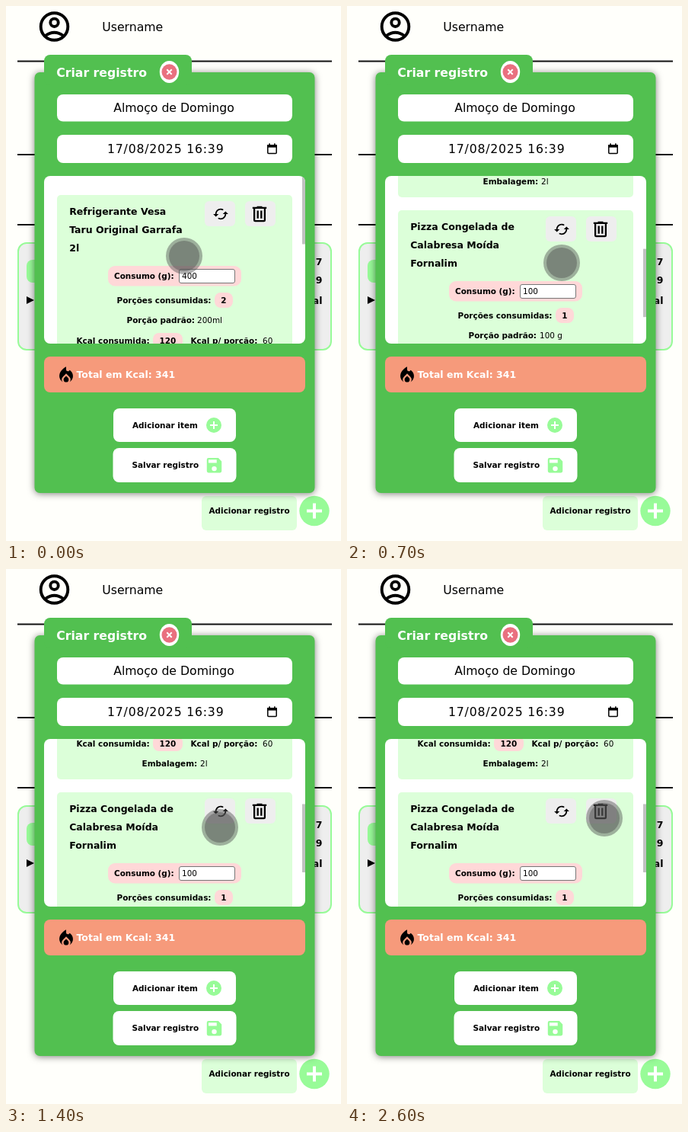
Write an HTML page with a canvas that moves like this. It is 440 px wide and 702 px high and loops after 2700 ms.

```html
<!DOCTYPE html>
<html lang="pt-BR">
<head>
<meta charset="utf-8">
<title>Criar registro</title>
<style>
  html, body { margin: 0; width: 100%; height: 100%; overflow: hidden; background: #fffffb; }
  canvas { display: block; }
</style>
</head>
<body>
<canvas id="stage" width="440" height="702"></canvas>
<script>
const ctx = document.getElementById('stage').getContext('2d');
const LOOP = 2700, STEP = 100;
const GREEN = '#52c050', MINT = '#98fb98', PALE = '#dcffd9', PINK = '#ffd8d8';
const SMALL = 10.45, MEDIUM = 12.5, LARGE = 15.7;
const LIST = { x: 50, y: 223, w: 343, h: 220 };

const icons = {
  sync: new Path2D('M19 8l-4 4h3c0 3.31-2.69 6-6 6-1 0-2-.25-2.8-.7l-1.46 1.46C9 19.5 10.4 20 12 20c4.42 0 8-3.58 8-8h3zM6 12c0-3.31 2.69-6 6-6 1 0 2 .25 2.8.7l1.46-1.46C15 4.5 13.6 4 12 4c-4.42 0-8 3.58-8 8H1l4 4 4-4z'),
  trash: new Path2D('M15 4V3H9v1H4v2h1v13a2 2 0 0 0 2 2h10a2 2 0 0 0 2-2V6h1V4zM17 19H7V6h10zM9 8h2v9H9zM13 8h2v9h-2z'),
  flame: new Path2D('M12 12.9l-2.13 2.09A2.9 2.9 0 0 0 9 17.06a3 3 0 0 0 6 0c0-.78-.31-1.52-.87-2.07zM16 6l-.44.55C14.38 8.02 12 7.19 12 5.3V2S4 6 4 13c0 2.92 1.56 5.47 3.89 6.86A4.8 4.8 0 0 1 8.47 13.56L12 10.1l3.53 3.47a4.8 4.8 0 0 1 .62 6.25c1.89-1.15 3.29-3.06 3.71-5.3C20.52 10.97 18.79 7.62 16 6z'),
  save: new Path2D('M17 3H5a2 2 0 0 0-2 2v14a2 2 0 0 0 2 2h14a2 2 0 0 0 2-2V7zM12 19a3 3 0 1 1 0-6 3 3 0 0 1 0 6zM15 9H5V5h10z')
};

const items = [
  {
    top: 248, height: 238,
    title: ['Refrigerante Vesa', 'Taru Original Garrafa', '2l'],
    grams: '400', portions: '2',
    portion: [159, 251, '200ml'],
    kcal: [93, 193, '120', 243, 337, '60'],
    pack: [179, 255, '2l']
  },
  {
    top: 503, height: 239,
    title: ['Pizza Congelada de', 'Calabresa Moída', 'Fornalim'],
    grams: '100', portions: '1',
    portion: [160, 253, '100 g'],
    kcal: [89.5, 190, '221', 239, 333, '221'],
    pack: [168.5, 244, '460 g']
  }
];

// Keyframes: [time, value...]
const scrollKeys = [[400, 0], [500, 55], [600, 105], [700, 235], [800, 315], [1200, 315], [1300, 245], [1400, 210]];
const pointerKeys = [[0, 234, 328], [100, 258, 318], [200, 287, 307], [300, 301, 304], [400, 294, 318],
  [500, 284, 334], [600, 282, 337], [1200, 282, 337], [1400, 281, 339], [1500, 283, 338],
  [1800, 319, 327], [2000, 336, 327], [2600, 338, 327]];

function sample(keys, t) {
  const next = keys.findIndex(k => k[0] > t);
  if (next === 0) return keys[0].slice(1);
  if (next < 0) return keys[keys.length - 1].slice(1);
  const a = keys[next - 1], b = keys[next];
  const p = (t - a[0]) / (b[0] - a[0]);
  return a.slice(1).map((v, i) => v + (b[i + 1] - v) * p);
}

function box(x, y, w, h, r, fill, stroke, lineWidth = 1) {
  ctx.beginPath();
  ctx.roundRect(x, y, w, h, r);
  if (fill) { ctx.fillStyle = fill; ctx.fill(); }
  if (stroke) { ctx.strokeStyle = stroke; ctx.lineWidth = lineWidth; ctx.stroke(); }
}

function oval(x, y, rx, ry, fill) {
  ctx.beginPath();
  ctx.ellipse(x, y, rx, ry, 0, 0, Math.PI * 2);
  ctx.fillStyle = fill;
  ctx.fill();
}

function line(color, width, ...points) {
  ctx.beginPath();
  for (let i = 0; i < points.length; i += 4) {
    ctx.moveTo(points[i], points[i + 1]);
    ctx.lineTo(points[i + 2], points[i + 3]);
  }
  ctx.strokeStyle = color;
  ctx.lineWidth = width;
  ctx.stroke();
}

function text(str, x, y, size = SMALL, weight = 'bold', color = '#000', align = 'left') {
  ctx.font = `${weight} ${size}px "DejaVu Sans", sans-serif`;
  ctx.fillStyle = color;
  ctx.textAlign = align;
  ctx.fillText(str, x, y);
}

function icon(path, x, y, scale, color) {
  ctx.save();
  ctx.translate(x, y);
  ctx.scale(scale, scale);
  ctx.translate(-12, -12);
  ctx.fillStyle = color;
  ctx.fill(path, 'evenodd');
  ctx.restore();
}

function plus(x, y, r, arm, width) {
  oval(x, y, r, r, MINT);
  line('#fff', width, x - arm, y, x + arm, y, x, y - arm, x, y + arm);
}

function drawAvatar() {
  ctx.strokeStyle = '#000';
  ctx.lineWidth = 3.9;
  for (const [y, r] of [[27, 17.8], [21.8, 5.2]]) {
    ctx.beginPath();
    ctx.arc(63.5, y, r, 0, Math.PI * 2);
    ctx.stroke();
  }
  ctx.beginPath();
  ctx.moveTo(51.5, 39.3);
  ctx.quadraticCurveTo(63.5, 30.4, 75.5, 39.3);
  ctx.stroke();
}

function drawPage() {
  ctx.fillStyle = '#fffffb';
  ctx.fillRect(0, 0, 440, 702);
  drawAvatar();
  text('Username', 126.3, 33, LARGE, 'normal');
  for (const y of [72.5, 195, 287]) line('#111', 2, 15, y, 428, y);

  box(16, 311, 411, 140, 11, '#eeeeee', MINT, 2);
  box(27, 333, 40, 30, 8, MINT);
  ctx.beginPath();
  ctx.moveTo(27, 381);
  ctx.lineTo(37, 386);
  ctx.lineTo(27, 391);
  ctx.fillStyle = '#000';
  ctx.fill();
  text('7', 415.5, 340, MEDIUM, 'bold', '#000', 'right');
  text('9', 415.5, 364, MEDIUM, 'bold', '#000', 'right');
  text('Kcal', 415.5, 391, MEDIUM, 'bold', '#000', 'right');

  box(257, 643, 125, 45, 6, PALE);
  text('Adicionar registro', 266.5, 666);
  plus(405, 662.5, 19.7, 10, 4);
}

function drawCalendar() {
  box(343.8, 182.8, 11.4, 10.8, 1, null, '#000', 1.5);
  ctx.fillStyle = '#000';
  ctx.fillRect(343.2, 182, 12.6, 3.6);
  ctx.fillRect(345.3, 180.3, 1.6, 2.5);
  ctx.fillRect(352.1, 180.3, 1.6, 2.5);
}

function drawModal() {
  ctx.save();
  ctx.shadowColor = 'rgba(0,0,0,.5)';
  ctx.shadowBlur = 10;
  ctx.shadowOffsetY = 1;
  box(37.5, 87, 368, 552, 7, GREEN);
  ctx.restore();
  box(50, 64, 194, 40, 8, GREEN);
  text('Criar registro', 66.2, 93, LARGE, 'bold', '#fff');
  oval(214.5, 86.5, 12.7, 14.5, '#fff');
  oval(214.5, 86.5, 10, 10.2, '#e9707f');
  line('#fff', 2, 211.3, 83.3, 217.7, 89.7, 217.7, 83.3, 211.3, 89.7);

  box(67, 116, 309, 35.5, 8, '#fff');
  text('Almoço de Domingo', 141.2, 139, LARGE, 'normal');
  box(67, 169, 309, 37, 8, '#fff');
  ctx.letterSpacing = '0.8px';
  text('17/08/2025 16:39', 133, 193, LARGE, 'normal');
  ctx.letterSpacing = '0px';
  drawCalendar();

  box(50, 460, 343, 47, 8, '#f69a7b');
  icon(icons.flame, 79, 484.5, 1.12, '#000');
  text('Total em Kcal: 341', 92.5, 488, MEDIUM, 'bold', '#fff');

  box(141, 528, 161, 44, 8, '#fff');
  text('Adicionar item', 166, 554);
  plus(273, 550, 10, 5, 2);
  box(140.5, 580, 162, 45, 8, '#fff');
  text('Salvar registro', 165.5, 606);
  icon(icons.save, 273.5, 602.8, 1.08, MINT);
}

function drawItem(item) {
  const y = item.top;
  box(67, y, 309, item.height, 5, PALE);
  box(261, y + 8, 40, 33, 6, '#eeeeee');
  box(314, y + 8, 40, 33, 6, '#eeeeee');
  icon(icons.sync, 282, y + 25, 0.9, '#000');
  icon(icons.trash, 333, y + 25, 1.15, '#000');
  item.title.forEach((row, i) => text(row, 83.2, y + 26 + i * 23.9, MEDIUM));

  box(134, y + 93, 175, 26.5, 9, PINK);
  text('Consumo (g):', 142, y + 110);
  box(227.5, y + 97.5, 73, 18, 2.5, '#fff', '#767676');
  text(item.grams, 231, y + 110, SMALL, 'normal');

  text('Porções consumidas:', 145.5, y + 142);
  box(274, y + 128, 24, 20, 8, PINK);
  text(item.portions, 286, y + 142, SMALL, 'bold', '#000', 'center');

  const [portionX, sizeX, size] = item.portion;
  text('Porção padrão:', portionX - 0.5, y + 168);
  text(size, sizeX, y + 168, SMALL, 'normal');

  const [labelX, pillX, total, eachX, valueX, each] = item.kcal;
  text('Kcal consumida:', labelX - 0.5, y + 195);
  box(pillX, y + 181, 39, 20, 8, PINK);
  text(total, pillX + 19.3, y + 195, SMALL, 'bold', '#000', 'center');
  text('Kcal p/ porção:', eachX - 0.5, y + 195);
  text(each, valueX, y + 195, SMALL, 'normal');

  const [packX, amountX, amount] = item.pack;
  text('Embalagem:', packX - 0.5, y + 221);
  text(amount, amountX, y + 221, SMALL, 'normal');
}

function drawList(scroll) {
  ctx.save();
  box(LIST.x, LIST.y, LIST.w, LIST.h, 8, '#fff');
  ctx.clip();
  ctx.save();
  ctx.translate(0, -scroll);
  items.forEach(drawItem);
  ctx.restore();
  ctx.fillStyle = '#c1c1c1';
  ctx.fillRect(389, LIST.y + scroll * 0.407, 4, 89.5);
  ctx.restore();
}

function draw(t) {
  const [scroll] = sample(scrollKeys, t);
  const [x, y] = sample(pointerKeys, t);
  drawPage();
  drawModal();
  drawList(scroll);
  oval(x, y, 24, 24, 'rgba(80,80,80,.45)');
  oval(x, y, 20, 20, 'rgba(80,80,80,.45)');
}

const start = performance.now();
function tick() {
  const t = (performance.now() - start) % LOOP;
  draw(Math.floor(t / STEP) * STEP);
  requestAnimationFrame(tick);
}
tick();
</script>
</body>
</html>
```
